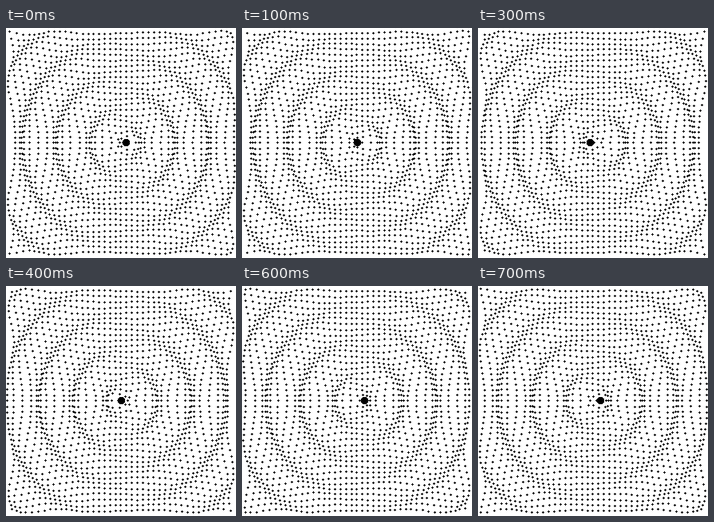
These frames come from a looping animation (288x288 px, 800 ms). An HTML page with a canvas:

```html
<!DOCTYPE html>
<html lang="en">
<head>
<meta charset="utf-8">
<title>Dipole wave</title>
<style>
html, body { margin: 0; width: 100%; height: 100%; overflow: hidden; background: #fff; }
canvas { display: block; width: 288px; height: 288px; }
</style>
</head>
<body>
<canvas id="stage" width="288" height="288"></canvas>
<script>
const ctx = document.getElementById('stage').getContext('2d');
const TAU = 2 * Math.PI;
const STEP = 100, STEPS = 8;
const COUNT = 41, GAP = 6.875, FIRST = 5.95;
const SOURCE = { x: 146.9, y: 143.45, swing: 7, radius: 4.6 };
const WAVE = { length: 43, swing: 5, lead: TAU / 24 };

function plus(x, y) {
  x = Math.round(x);
  y = Math.round(y);
  ctx.fillRect(x - 1, y, 3, 1);
  ctx.fillRect(x, y - 1, 1, 3);
}

function disc(x, y, r) {
  x = Math.round(x);
  y = Math.round(y);
  for (let dy = -4; dy <= 4; dy++) {
    const half = Math.floor(Math.sqrt(r * r - dy * dy));
    ctx.fillRect(x - half, y + dy, 2 * half + 1, 1);
  }
}

function draw(step) {
  const phase = TAU * (step + 1.5) / STEPS;
  ctx.fillStyle = '#fff';
  ctx.fillRect(0, 0, 288, 288);
  ctx.fillStyle = '#000';
  for (let row = 0; row < COUNT; row++) {
    for (let col = 0; col < COUNT; col++) {
      const x = FIRST + col * GAP, y = FIRST + row * GAP;
      const dx = x - SOURCE.x, dy = y - SOURCE.y;
      const r = Math.hypot(dx, dy);
      // radial displacement, weighted by the cosine of the angle
      const u = WAVE.swing * dx / r * Math.cos(phase + WAVE.lead - TAU * r / WAVE.length);
      plus(x + u * dx / r, y + u * dy / r);
    }
  }
  disc(SOURCE.x + SOURCE.swing * Math.cos(phase), SOURCE.y, SOURCE.radius);
}

let shown = -1;
function tick() {
  const step = Math.floor(performance.now() / STEP) % STEPS;
  if (step !== shown) draw(shown = step);
  requestAnimationFrame(tick);
}
tick();
</script>
</body>
</html>
```
